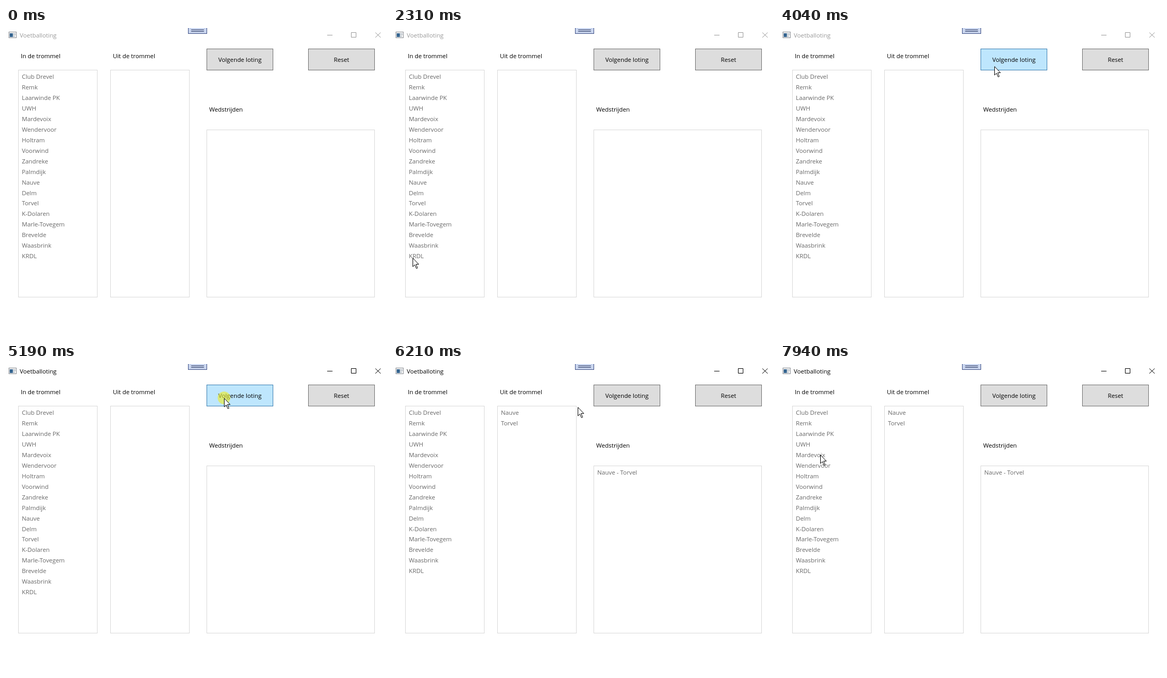
Animation, 720 px wide and 582 px high, one loop 8000 ms. Source, as an HTML page:

```html
<!DOCTYPE html>
<html lang="nl">
<head>
<meta charset="utf-8">
<title>Voetballoting</title>
<style>
  html, body { margin: 0; width: 100%; height: 100%; overflow: hidden; background: #fff; }
  svg { position: absolute; display: block; }
  #stage { left: 0; top: 0; width: 720px; height: 582px; }
  text { font: 11.33px "Open Sans", "Noto Sans", sans-serif; white-space: pre; }
  .items { fill: #686868; }
  .box { fill: #fff; stroke: #d9d9d9; }
  .button { fill: #ddd; stroke: #707070; }
  .chrome { fill: none; stroke: currentColor; }

  #bar, #draw, #before, #after, #click { animation: 8s step-end infinite; }
  #bar { animation-name: activate; }
  #draw { animation-name: hover; }
  #before { animation-name: hide; }
  #after { animation-name: show; }
  #click { animation-name: click; }

  @keyframes activate { 0% { color: #999; } 64.875%, 100% { color: #000; } }
  @keyframes hover {
    0%, 77.625%, 100% { fill: #ddd; stroke: #707070; }
    49.375% { fill: #bee6fd; stroke: #3c7fb1; }
  }
  @keyframes hide { 0% { visibility: visible; } 67%, 100% { visibility: hidden; } }
  @keyframes show { 0% { visibility: hidden; } 67%, 100% { visibility: visible; } }
  @keyframes click {
    0%, 67%, 100% { visibility: hidden; }
    64.875% { visibility: visible; }
  }

  /* The pointer advances in discrete ticks of about 80 ms. */
  #pointer { width: 13px; height: 22px; animation: travel 8s steps(1) infinite; }
  @keyframes travel {
    0% { left: -40px; top: 0; }
    9.25% { left: 688px; top: 556px; animation-timing-function: steps(3); }
    12.375% { left: 330px; top: 200px; animation-timing-function: steps(3); }
    15.5% { left: 153px; top: 91px; }
    16.25% { left: 115px; top: 84px; }
    17.2125% { left: 80px; top: 82px; animation-timing-function: steps(2); }
    19.125% { left: 33px; top: 102px; }
    20.125% { left: 24px; top: 130px; animation-timing-function: steps(3); }
    22.9125% { left: 20px; top: 260px; animation-timing-function: steps(4); }
    26.625% { left: 37px; top: 437px; }
    28.875% { left: 37px; top: 434px; animation-timing-function: steps(5); }
    33.875% { left: 60px; top: 300px; animation-timing-function: steps(5); }
    38.875% { left: 58px; top: 130px; }
    39.75% { left: 58px; top: 128px; animation-timing-function: steps(3); }
    42.75% { left: 50px; top: 112px; }
    43.75% { left: 54px; top: 110px; animation-timing-function: steps(3); }
    46.5625% { left: 180px; top: 88px; animation-timing-function: steps(3); }
    49.375% { left: 399px; top: 75px; }
    50.5% { left: 405px; top: 72px; animation-timing-function: steps(6); }
    56.375% { left: 412px; top: 64px; }
    69.875% { left: 413px; top: 63px; }
    76.75% { left: 400px; top: 67px; }
    77.625% { left: 349px; top: 81px; }
    78.625% { left: 310px; top: 89px; animation-timing-function: steps(4); }
    82.5625% { left: 240px; top: 101px; animation-timing-function: steps(4); }
    86.5% { left: 222px; top: 102px; }
    87.375% { left: 222px; top: 106px; }
    88.4375% { left: 222px; top: 113px; }
    89.5% { left: 222px; top: 111px; }
    94.25% { left: 205px; top: 115px; animation-timing-function: steps(5); }
    99.25%, 100% { left: 76px; top: 171px; }
  }
</style>
</head>
<body>
<svg id="stage" viewBox="0 0 720 582">
  <!-- Title bar -->
  <rect x="5.5" y="7.5" width="14" height="11" fill="#f4f4f4" stroke="#8b8f94"/>
  <path d="M7 10h6v7h-6z" fill="#35648f"/>
  <path d="M14 10h2v3h-2zM17 10h1v3h-1zM14 14h2v3h-2z" fill="#a9b5c0"/>
  <g id="bar">
    <text x="26" y="18" fill="currentColor">Voetballoting</text>
    <path class="chrome" d="M607 13.5h10M652.5 8.5h9v9h-9zM698 8.5l10 9.5M708 8.5l-10 9.5"/>
  </g>
  <rect x="344.5" y="-.5" width="35" height="11" fill="#c9d5ee" stroke="#3d4f85"/>
  <path d="M350 3.5h24M350 6.5h24" stroke="#26335c"/>

  <!-- Form -->
  <text x="28" y="57">In de trommel</text>
  <text x="202" y="57">Uit de trommel</text>
  <text x="384" y="158">Wedstrijden</text>
  <rect class="box" x="23.5" y="79.5" width="149" height="429"/>
  <rect class="box" x="197.5" y="79.5" width="149" height="429"/>
  <rect class="box" x="379.5" y="192.5" width="317" height="316"/>
  <rect class="button" id="draw" x="379.5" y="39.5" width="125" height="40"/>
  <rect class="button" x="571.5" y="39.5" width="125" height="40"/>
  <g text-anchor="middle">
    <text x="442" y="64">Volgende loting</text>
    <text x="634" y="64">Reset</text>
  </g>

  <g class="items" id="before"></g>
  <g class="items" id="after"></g>
  <circle id="click" cx="412" cy="64" r="12" fill="#ecec28" opacity=".62"/>
</svg>
<svg id="pointer" viewBox="0 0 13 22">
  <path d="M.5 .8V17L4.2 13.5 7.2 20.5 9.4 19.5 6.5 12.5H11.6Z" fill="#fff" stroke="#000"/>
</svg>
<script>
  const teams = ["Club Drevel", "Remk", "Laarwinde PK", "UWH", "Mardevoix", "Wendervoor",
    "Holtram", "Voorwind", "Zandreke", "Palmdijk", "Nauve", "Delm", "Torvel", "K-Dolaren",
    "Marle-Tovegem", "Brevelde", "Waasbrink", "KRDL"];
  const drawn = ["Nauve", "Torvel"];
  const ROW = 19.95;

  function addList(id, x, y, items) {
    const group = document.getElementById(id);
    items.forEach((item, i) => {
      const row = document.createElementNS("http://www.w3.org/2000/svg", "text");
      row.setAttribute("x", x);
      row.setAttribute("y", Math.round(y + 0.06 + ROW * i));
      row.textContent = item;
      group.append(row);
    });
  }

  addList("before", 30, 96, teams);
  addList("after", 30, 96, teams.filter(team => !drawn.includes(team)));
  addList("after", 204, 96, drawn);
  addList("after", 386, 209, [drawn.join(" - ")]);
</script>
</body>
</html>
```
